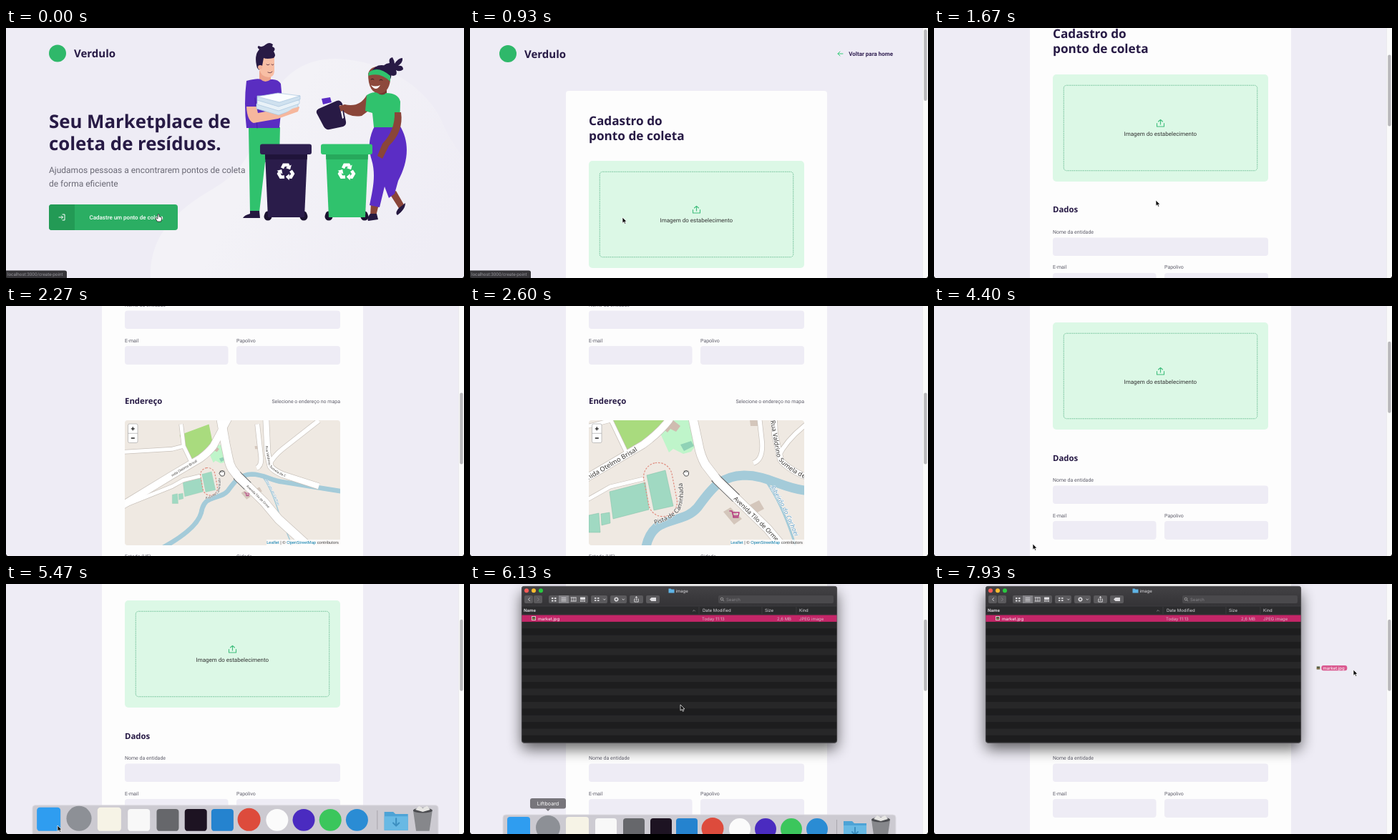
Write an HTML page that moves like this. It is 640x350 px and loops after 8000 ms.

```html
<!DOCTYPE html>
<html lang="pt-BR">
<head>
<meta charset="utf-8">
<title>Ponto de coleta</title>
<style>
html,body{margin:0;width:100%;height:100%;overflow:hidden;background:#eeecf5}
svg{display:block;width:100vw;height:100vh}
text{font-family:Roboto,sans-serif;white-space:pre;text-rendering:geometricPrecision}
.h{font-family:"Noto Sans","Open Sans",sans-serif;font-weight:700;fill:#271a45}
.l{font-size:7px;fill:#5f5e6b}
.in{fill:#eeecf5}
.m text{font-family:"Noto Sans","Open Sans",sans-serif;font-weight:500;fill:#35322f;stroke:#fff;stroke-width:1.2;paint-order:stroke}
.m .road{fill:none;stroke-linejoin:round;vector-effect:non-scaling-stroke}
.w text{font-family:Inter,sans-serif;font-size:6px;fill:#dddce0}
.ln{fill:none;stroke-linecap:round;stroke-linejoin:round}
</style>
</head>
<body>
<svg viewBox="0 0 640 350" xmlns="http://www.w3.org/2000/svg">
<defs>
  <clipPath id="mapClip"><rect x="0" y="0" width="301" height="175" rx="4"/></clipPath>
  <clipPath id="winClip"><rect x="72" y="3" width="441" height="219.5" rx="4"/></clipPath>
  <filter id="shade" x="-20%" y="-20%" width="140%" height="150%"><feGaussianBlur stdDeviation="10"/></filter>
  <linearGradient id="bar" x2="0" y2="1"><stop stop-color="#434245"/><stop offset="1" stop-color="#343336"/></linearGradient>
  <linearGradient id="blob" y1=".2" y2=".6"><stop offset=".4" stop-color="#f3f2f7"/><stop offset="1" stop-color="#efedf5"/></linearGradient>
  <g id="arm"><path d="M-4.600-4.800L-2.500-9H2.500L3.500-7" fill="none" stroke="#fff" stroke-width="4.200"/><path d="M7.200-9.200L-.2-5L5.600-3Z" fill="#fff"/></g>
  <g id="recycle"><g transform="scale(1.080)"><use href="#arm"/><use href="#arm" transform="rotate(120)"/><use href="#arm" transform="rotate(240)"/></g></g>
  <path id="pLeft" d="M-2 81L80 32L110 0"/>
  <path id="pMain" d="M204 108L250 153L300 206"/>
  <path id="pRua" d="M257 0L265 48Q269 62 301 78L350 98"/>
  <path id="pRio" d="M256 92Q277 125 297 178L320 240"/>
  <path id="pPista" d="M92 146Q120 138 128 124Q136 106 128 78"/>
  <path id="pNear" d="M169 5L174 26Q179 42 190 53L224 94L290 160"/>
</defs>

<rect width="640" height="350" fill="#eeecf5"/>

<g id="home">
  <path d="M202 350C200 295 232 258 288 226C350 190 345 150 366 108C386 62 420 43 460 43C530 45 583 82 606 124C616 148 628 168 640 182V350Z" fill="url(#blob)"/>
  <circle cx="72" cy="35.500" r="12" fill="#2fb86a"/>
  <text class="h" x="95" y="41" font-size="15">Verdulo</text>
  <g font-size="25.800"><text class="h" x="60" y="140">Seu Marketplace de</text><text class="h" x="60" y="171">coleta de resíduos.</text></g>
  <g font-size="12" fill="#6a6975"><text x="60" y="203">Ajudamos pessoas a encontrarem pontos de coleta</text><text x="60" y="222">de forma eficiente</text></g>
  <rect x="60" y="247" width="180" height="36" rx="4" fill="#2bae63"/>
  <path d="M64 247H96V283H64Q60 283 60 279V251Q60 247 64 247Z" fill="#239a55"/>
  <path d="M79 261H82V269H79M74 265H79.500M77.500 263L79.500 265L77.500 267" class="ln" stroke="#fff"/>
  <text x="168" y="268" font-size="8" font-weight="500" fill="#fff" text-anchor="middle">Cadastre um ponto de coleta</text>

  <!-- man -->
  <path d="M339 139H383L382 180L362 188L354 258H341Z" fill="#30c26d"/>
  <path d="M341 256H354L355 266H331Q333 262 341 260Z" fill="#251840"/>
  <path d="M354 60H370V76Q362 82 354 75Z" fill="#eda58c"/>
  <path d="M353 40Q363 32 375 40L375 61Q374 69 367 69Q356 68 354 58Z" fill="#f8bea4"/>
  <path d="M351 56Q346 38 354 30Q350 27 353 25Q358 28 363 23Q368 19 373 23L372 26Q378 28 374 33Q378 38 374 42Q364 44 360 42L358 53Q354 50 354 59Z" fill="#281a45"/>
  <circle cx="355" cy="55" r="3" fill="#f3b097"/>
  <path d="M364 51Q366 53 368 51M371 51Q373 53 374 51M366 62Q370 64 372 61" class="ln" stroke="#5c3040" stroke-width=".9"/>
  <path d="M336 74Q352 70 356 72Q362 78 370 72Q380 71 384 78L386 100L382 140H336Q332 105 336 74Z" fill="#5a2dc1"/>
  <path d="M348 98L351 140" class="ln" stroke="#4420a0"/>
  <path d="M336 110H350L352 119L384 113Q398 106 410 111L408 117L380 127L346 133Q337 130 336 110Z" fill="#f6b79d"/>
  <g stroke="#a8c5de" stroke-width=".7"><path d="M350 113L381 122L408 112V106L350 106Z" fill="#d4e5f1"/><path d="M351 107L381 116L410 106V101L351 101Z" fill="#e9f2f8"/><path d="M351 101L381 110L411 100V95L351 95Z" fill="#cfe1ef"/><path d="M351 96L380 91L411 95L382 104Z" fill="#fafdff"/></g>
  <path d="M388 121L400 113L410 110L407 117Z" fill="#f6b79d"/>

  <!-- woman -->
  <path d="M510 245L521 247L517 263H509ZM536 232L545 228L557 249L550 254Z" fill="#8a4539"/>
  <path d="M516 136H550C565 160 562 188 548 214L543 232L535 238L529 222L522 251L508 248C513 225 517 205 511 185C505 165 508 150 516 136Z" fill="#5b2dc5"/>
  <path d="M509 260H518L520 268L506 270Q504 266 509 260ZM549 252L558 245Q558 254 547 262Q543 259 549 252Z" fill="#251840"/>
  <path d="M504 94Q494 112 473 107L468 114Q480 126 497 123L513 111Z" fill="#8a4539"/>
  <path d="M517 82H532V94Q523 98 516 92Z" fill="#74372f"/>
  <path d="M506 64Q509 53 522 54Q537 57 537 73Q535 91 521 92Q506 90 506 64Z" fill="#8d493c"/>
  <path d="M510 62Q517 49 531 53Q542 59 537 72Q530 61 510 62Z" fill="#281a45"/>
  <path d="M527 58Q526 50 536 49Q534 42 540 41Q543 46 543 50Q548 42 554 42Q555 48 548 53Q555 52 555 58Q550 62 545 59Q548 66 541 67Q531 65 527 58Z" fill="#281a45"/>
  <path d="M507 62Q520 52 537 67L537 75Q523 61 506 67Z" fill="#30c26d"/>
  <path d="M510 72Q512 70 514 72M522 73Q524 71 526 73" class="ln" stroke="#351a24" stroke-width="1"/>
  <path d="M510 80Q516 83 523 80Q517 90 510 80Z" fill="#fff"/>
  <path d="M504 94Q514 88 519 91Q526 96 531 91Q548 91 551 103L550 139H514L512 119L502 116Z" fill="#30c26d"/>
  <path d="M543 118H552Q556 145 535 165L526 183L519 179L526 162Q544 143 543 118Z" fill="#8a4539"/>
  <path d="M441 99L453 97L455 104L443 107Z" fill="#5b2dc5"/>
  <path d="M437 113L462 102Q467 100 470 106L475 131Q476 136 471 138L452 142Q447 143 444 138L434 119Q433 115 437 113ZM466 108L470 127L472 126L469 108Z" fill="#281a45" fill-rule="evenodd"/>
  <path d="M465 109L474 107L476 113L468 117Z" fill="#8a4539"/>
  <g id="bins"></g>
</g>

<g id="form">
  <g id="page">
    <circle cx="53" cy="36" r="12" fill="#2fb86a"/>
    <text class="h" x="76" y="41.500" font-size="15">Verdulo</text>
    <path d="M521 36H514M517 33L514 36L517 39" class="ln" stroke="#34cb79"/>
    <text x="591" y="39" font-size="8" font-weight="700" fill="#322153" text-anchor="end">Voltar para home</text>
    <rect x="134" y="88" width="365" height="1068" rx="4" fill="#fdfdfd"/>
    <g font-size="17.200"><text class="h" x="166" y="135.500">Cadastro do</text><text class="h" x="166" y="156.500">ponto de coleta</text></g>
    <rect x="166" y="186" width="301" height="150" rx="5" fill="#dcf8e6"/>
    <rect x="181.250" y="201.250" width="270.500" height="119.500" rx="4" fill="none" stroke="#55b384" stroke-width=".8" stroke-dasharray="1.6 1"/>
    <path d="M311.500 254.500V259H321.500V254.500M316.500 256V249.500M313.500 252L316.500 249.300L319.500 252" class="ln" stroke="#3fbd7c" stroke-width="1.100"/>
    <text x="316.300" y="272" font-size="8" fill="#333" text-anchor="middle">Imagem do estabelecimento</text>
    <g font-size="11.400"><text class="h" x="166" y="379.500">Dados</text><text class="h" x="166" y="545">Endereço</text></g>
    <text class="l" x="166" y="409">Nome da entidade</text>
    <text class="l" x="166" y="458.500">E-mail</text>
    <text class="l" x="322" y="458.500">Papolivo</text>
    <rect class="in" x="166" y="414.500" width="301" height="25.500" rx="4"/>
    <rect class="in" x="166" y="464" width="144.500" height="26" rx="4"/>
    <rect class="in" x="322" y="464" width="145" height="26" rx="4"/>
    <text class="l" x="467" y="543.500" text-anchor="end">Selecione o endereço no mapa</text>
    <g class="m" transform="translate(166 568)" clip-path="url(#mapClip)">
      <rect width="301" height="175" fill="#efe9e2"/>
      <g id="map">
        <path d="M31 0L20 -30L100 -60L112 0L76 36L53 46Z" fill="#a9db7e"/>
        <path d="M98 14L112 -4L146 -2L153 30L143 44L132 47L118 40L112 45Z" fill="#bff5ca"/>
        <path d="M128 34L143 29L147 36L133 43Z" fill="#90d2b6"/>
        <path d="M104 12L109 4L118 0L128 8L122 16L114 12L110 17Z" fill="#cfbcb0"/>
        <path d="M225 0H236V8H226ZM188 128L198 122L214 138L203 146ZM222 120L238 112L245 124L230 132Z" fill="#d4c6bb"/>
        <path d="M-140 330Q60 250 79 182Q84 152 104 145C126 136 140 136 152 122C170 98 182 78 217 77C250 77 268 94 301 98L470 125" fill="none" stroke="#a4cbd9" stroke-width="13"/>
        <path d="M248 86Q272 120 290 180L330 280" fill="none" stroke="#a4cbd9" stroke-width="3"/>
        <g fill="#a0d9c2" stroke="#7fbfa5" stroke-width=".5"><path d="M29 100L79 87L84 125L34 138ZM81 77L107 70L118 120L91 126ZM0 133L14 130L16 157H0ZM17 131L29 129L30 144L18 147Z"/></g>
        <rect x="80" y="59" width="40" height="76" rx="20" transform="rotate(-11 100 97)" fill="none" stroke="#e08d80" stroke-width="1.200" stroke-dasharray="2.500 1.800" vector-effect="non-scaling-stroke"/>
        <g id="roads"></g>
        <g id="farText">
          <text font-size="9.200" dy="3"><textPath href="#pLeft">nida Otelmo Brisal</textPath></text>
          <text font-size="8.400" dy="3"><textPath href="#pMain">Avenida Tilo de Orme</textPath></text>
          <text font-size="8.800" dy="3"><textPath href="#pRua">Rua Valdrino Sumela de C</textPath></text>
          <text font-size="8.800" font-style="italic" dy="3" style="fill:#5f9cc2"><textPath href="#pRio">Ribeirão do Cachoei</textPath></text>
          <text font-size="8.600"><textPath href="#pPista">Pista de Caminhada</textPath></text>
          <path d="M197 127H200L202 134H209L210 129H201M202 134V136H209" class="ln" stroke="#b5397f" stroke-width="1.500"/>
        </g>
      </g>
      <g id="nearText">
        <text font-size="5.600" dy="2"><textPath href="#pNear">Avenida Tilo de Orme</textPath></text>
        <text font-size="5.600" dy="2"><textPath href="#pNear" startOffset="104">Avenida Tilo de Orme</textPath></text>
      </g>
      <g stroke="#aaa" stroke-width=".7"><rect x="4.500" y="5" width="13.500" height="26.500" rx="2" fill="#fff"/><path d="M4.500 18.300H18"/></g>
      <path id="plus" d="M8.800 11.800H13.800M11.300 9.300V14.300" stroke-width="1.300"/>
      <path d="M8.800 25H13.800" stroke="#222" stroke-width="1.300"/>
      <rect x="198" y="167" width="103" height="8" fill="#fff" opacity=".75"/>
      <text x="299" y="173" font-size="5.800" text-anchor="end" style="fill:#444;stroke:none;font-weight:400;font-family:'Liberation Sans',sans-serif"><tspan fill="#0078a8">Leaflet</tspan> | © <tspan fill="#0078a8">OpenStreetMap</tspan> contributors</text>
    </g>
    <text class="l" x="166" y="761">Estado (UF)</text>
    <text class="l" x="322" y="761">Cidade</text>
    <rect class="in" x="166" y="766" width="144.500" height="26" rx="4"/>
    <rect class="in" x="322" y="766" width="145" height="26" rx="4"/>
  </g>
  <path d="M632.500 0H640V350H632.500Z" fill="#fafafa"/><path d="M632.500 0V350" stroke="#e6e5ea" stroke-width=".7"/>
  <rect id="thumb" x="634.200" width="4.400" height="100" rx="2.200" fill="#b9b8bb"/>
</g>

<g id="status">
  <path d="M0 339.500H82Q85 339.500 85 342V350H0Z" fill="#37363a"/>
  <text x="2" y="347" font-size="6.300" fill="#96959b">localhost:3000/create-point</text>
</g>

<g id="win" class="w">
  <rect x="72" y="12" width="441" height="219" rx="6" opacity=".6" filter="url(#shade)"/>
  <g clip-path="url(#winClip)">
    <rect x="72" y="3" width="441" height="220" fill="#1d1d1e"/>
    <g id="rows"></g>
    <rect x="72" y="3" width="441" height="28" fill="url(#bar)"/>
    <rect x="72" y="31" width="441" height="12" fill="#2b2b2d"/>
    <path d="M72 31H513M72 43H513M320 32V42M408 32V42M456 32V42" stroke="#454448" stroke-width=".6"/>
    <circle cx="79" cy="9.300" r="3" fill="#fc5b57"/><circle cx="89" cy="9.300" r="3" fill="#fdbc2f"/><circle cx="99" cy="9.300" r="3" fill="#29c940"/>
    <path d="M277.500 6.500H280.500L281.500 7.500H285.500V12.500H277.500Z" fill="#5fb4e6"/>
    <text x="287.500" y="11.700">image</text>
    <g id="tools" fill="#5b5a5d"></g>
    <g class="ln" stroke="#dcdbde" stroke-width=".9"><path d="M83.500 19.500L81.500 21.500L83.500 23.500M186.500 21L187.800 22.300L189.100 21M213 21L214.300 22.300L215.600 21M230.500 21H229.800V25H235.200V21H234.500M232.500 23V17.500M231 19L232.500 17.500L234 19"/><path d="M94.500 19.500L96.500 21.500L94.500 23.500" stroke="#858488"/><circle cx="204.500" cy="21.500" r="2.200" stroke-width="1.700" stroke-dasharray="1 .7"/><path d="M142 19V24M145 19V24M148 19V24M141 19H148M141 24H148M128 19.300H134M128 21.500H134M128 23.700H134"/></g>
    <path d="M114 19H116.500V21H114ZM118 19H120.500V21H118ZM114 22.500H116.500V24.500H114ZM118 22.500H120.500V24.500H118ZM154 18.500H161V22H154ZM154 23H156V24.500H154ZM156.500 23H158.500V24.500H156.500ZM159 23H161V24.500H159ZM174 19H176.500V20.800H174ZM178 19H180.500V20.800H178ZM174 22.300H176.500V24H174ZM178 22.300H180.500V24H178ZM251 21.500L253.500 19H260V24H253.500Z" fill="#dcdbde"/>
    <circle cx="352" cy="21" r="1.800" fill="none" stroke="#aaa" stroke-width=".8"/><path d="M353.300 22.300L355 24" stroke="#aaa" stroke-width=".8"/>
    <text x="358" y="23.600" style="fill:#858488">Search</text>
    <text x="75" y="39.200" font-weight="700">Name</text><text x="325" y="39.200">Date Modified</text><text x="412" y="39.200">Size</text><text x="460" y="39.200">Kind</text>
    <path d="M311.500 38L313 36.500L314.500 38" class="ln" stroke="#aaa" stroke-width=".7"/>
    <rect x="72" y="43.500" width="441" height="9.400" fill="#c42668"/>
    <use href="#pic" x="86" y="45.200"/>
    <text x="95" y="50.500" style="fill:#fff">market.jpg</text>
    <g style="opacity:.8"><text x="324" y="50.500">Today 11:13</text><text x="449" y="50.500" text-anchor="end">2,6 MB</text><text x="460" y="50.500">JPEG image</text></g>
  </g>
  <rect x="72.300" y="3.300" width="440.400" height="219" rx="4" fill="none" stroke="#626166" stroke-width=".6"/>
</g>

<g id="dock"></g>
<g id="tip" class="w"><rect x="84" y="300" width="50" height="14.500" rx="3" fill="#77757b"/><path d="M105.500 314.500H112.500L109 318Z" fill="#77757b"/><text x="109" y="309.800" text-anchor="middle" style="font-size:7.200px;fill:#fff">Liftboard</text></g>

<g id="ghost" class="w">
  <g id="pic"><rect width="6" height="5.600" fill="#e9e6df"/><rect x=".8" y=".8" width="4.400" height="4" fill="#4c5a44"/><rect x=".8" y="3" width="4.400" height="1" fill="#a9794e"/></g>
  <rect x="7.300" y="-.7" width="36" height="7.200" rx="3" fill="#d8407f" opacity=".85"/><text x="9.500" y="5" style="fill:#fff">market.jpg</text>
</g>

<g id="cursor">
  <path d="M0 0V8.200L2 6.500L3.300 9.300L4.700 8.700L3.500 6H6Z" fill="#111" stroke="#fff" stroke-width=".7"/>
  <path d="M-1-4Q0-5 1-4V-1L4 0Q5 1 4.500 3L3.500 6H-1.500L-4 2Q-4.500 0-2.500 1L-1 2Z" fill="#fff" stroke="#222" stroke-width=".8"/>
  <path d="M-3-1Q-3-4-1.300-3Q0-4.500 1.200-3Q3-3.500 3.500-1.500V1Q3 4 1.500 4H-1.500L-4 .5Q-4-1-3-.5ZM-1.200-1V-2.800M1.200-1V-2.800" fill="#fff" stroke="#222" stroke-width=".8"/>
  <path d="M-1.800-4Q0-4 0-3Q0-4 1.800-4M0-3V3M-1.800 4Q0 4 0 3Q0 4 1.800 4" class="ln" stroke="#333" stroke-width=".9"/>
</g>
<path d="M0 350V347.500L2 350ZM640 350V347.500L638 350Z" fill="#222"/>
</svg>
<script>
const $ = id => document.getElementById(id);
const LOOP = 8000;

const bin = (x, lid, body, dark) => `
  <g transform="translate(${x})"><circle cx="11" cy="261" r="4.500" fill="#1b1230"/><circle cx="61" cy="261" r="4.500" fill="#1b1230"/>
  <circle cx="11" cy="264" r="5.500" fill="#1b1230"/><circle cx="61" cy="264" r="5.500" fill="#1b1230"/>
  <path d="M7 176H66L62 265H11Z" fill="${body}"/><path d="M7 176H66L65.600 184H7.400Z" fill="${dark}"/>
  <rect y="162.500" width="72" height="14.500" rx="3" fill="${lid}"/><use href="#recycle" x="36" y="201.500"/></g>`;
$('bins').innerHTML = bin(355, '#2e2050', '#2a1c4a', '#20143a') + bin(440, '#31c56f', '#30c26d', '#27a85c');

const roads = [
  ['M-300 262L0 79L76 34Q98 18 112 0L160 -90', 10],
  ['M24 -60L31 0L53 46M-200 20L0 8L31 0', 5],
  ['M-200 190L0 110L30 93L76 82', 5],
  ['M130 -90L146 0L153 33Q156 50 163 62L180 84L250 152L290 200L400 300', 12],
  ['M255 -90L260 20L268 55Q275 66 301 78L400 110', 8],
  ['M400 -70L301 8Q276 28 264 52M232 -60L242 30Q244 55 230 60', 6]
];
const stroke = (d, c, w) => `<path class="road" d="${d}" stroke="${c}" stroke-width="${w}"/>`;
$('roads').innerHTML = roads.map(([d, w]) => stroke(d, '#c8c1ba', w + 1.4)).join('') +
  stroke('M176 80L206 109', '#666', 14) +
  roads.map(([d, w]) => stroke(d, '#fff', w)).join('');

$('rows').innerHTML = Array.from({length: 10}, (_, i) =>
  `<rect x="72" y="${52.9 + i * 18.7}" width="441" height="9.350" fill="#272728"/>`).join('');
$('tools').innerHTML = [[76, 12], [89, 12], [110, 55], [169, 23], [196, 23], [223, 19], [246, 19]]
  .map(([x, w]) => `<rect x="${x}" y="16" width="${w}" height="11" rx="2"/>`).join('') +
  '<rect x="124" y="16" width="14" height="11" fill="#848387"/><rect x="347" y="16" width="161" height="11" rx="2" fill="#4a494c"/>';

const icons = [
  [68, 32, '#2f9df0'], [109, 34, '#8d9096', 1], [150, 32, '#f6f3e6'], [190, 30, '#f8f8f8'],
  [229, 30, '#66676b'], [267, 30, '#1d1322'], [303, 30, '#2583cf'], [339, 31, '#dd4b3c', 1],
  [377, 30, '#fbfbfb', 1], [413, 30, '#4a2bc0', 1], [449, 30, '#3bc65c', 1], [485, 30, '#2a8cd4', 1]
];
$('dock').innerHTML = '<rect x="46" y="311" width="549" height="44" rx="4" fill="#cbc9d0" stroke="#dedce2" opacity=".95"/>' +
  icons.map(([x, s, c, round]) => `<rect x="${x - s / 2}" y="${346 - s}" width="${s}" height="${s}" rx="${round ? s / 2 : 4}" fill="${c}"/>`).join('') +
  `<path d="M512.500 318V344" stroke="#a9a7ae"/>
  <path d="M522 320H534L537 323H554V345H522Z" fill="#4da3d6"/><path d="M522 326H554V345H522Z" fill="#68b9e4"/>
  <path d="M538 329V338M534 335L538 339L542 335" class="ln" stroke="#3c8fc0" stroke-width="2"/>
  <path d="M561 318H587L583 346H565Z" fill="#86878b"/><ellipse cx="574" cy="318" rx="13" ry="3.500" fill="#4b4c50"/>
  <path d="M564 317L569 312L574 315L580 312L584 317L574 320Z" fill="#e7e6e4"/>`;

// Value of a keyed track [[time, value...], ...] at t, eased between keys.
function at(track, t, col = 1) {
  if (t <= track[0][0]) return track[0][col];
  for (let i = 1; i < track.length; i++) {
    const a = track[i - 1], b = track[i];
    if (t < b[0]) {
      const u = (t - a[0]) / (b[0] - a[0]);
      return a[col] + (b[col] - a[col]) * u * u * (3 - 2 * u);
    }
  }
  return track[track.length - 1][col];
}

const OPEN = 430;
const scroll = [[1280, 0], [1670, 121], [1800, 200], [2130, 408], [2890, 408], [3120, 317], [3200, 317], [3560, 225], [3930, 176], [4070, 163]];
const zoom = [[2230, -1], [2600, 0], [2850, 1]];
const pos = [
  [0, 213, 265], [930, 213, 265], [1400, 310, 241], [1950, 310, 241], [2270, 302, 234], [2780, 302, 234],
  [3100, 193, 103], [3500, 193, 103], [3930, 185, 190], [4400, 138, 333], [4800, 137, 347], [5250, 72, 338],
  [5600, 72, 338], [5780, 112, 328], [6130, 294, 169], [6530, 165, 82], [7350, 138, 50.5], [7450, 138, 50.5], [7930, 586, 120]
];
const shapes = [[0, 1], [OPEN, 0], [2200, 2], [2870, 0], [3060, 3], [3560, 0]];
const dockY = [[4850, 46], [5130, 0], [5980, 0], [6130, 12], [6380, 46]];
const grow = [[4900, 1], [5250, 1.033], [5850, 1.033], [6100, 1]];
const open = [[5560, .4], [5670, .72], [5800, 1]];
const tip = [[5700, 0], [5760, 1], [6140, 1], [6260, 0]];

const show = (id, on) => $(id).style.display = on ? '' : 'none';
const move = (id, v) => $(id).setAttribute('transform', v);

function draw(t) {
  const s = at(scroll, t), z = 2 ** at(zoom, t), x = at(pos, t), y = at(pos, t, 2);
  show('home', t < OPEN);
  show('form', t >= OPEN);
  show('status', t < 1000);
  move('page', `translate(0 ${-s})`);
  $('thumb').setAttribute('y', 2 + s * .2927);

  move('map', `translate(136 74) scale(${z}) translate(-136 -74)`);
  show('farText', z < 1.9);
  show('nearText', z >= 1.9);
  $('plus').setAttribute('stroke', z >= 1.9 ? '#bbb' : '#222');

  const k = at(open, t), d = at(dockY, t);
  show('win', t >= 5560);
  $('win').style.opacity = Math.min(1, (k - .3) * 2);
  move('win', `translate(292 113) scale(${k}) translate(-292 -113)`);
  show('dock', d < 45);
  const g = at(grow, t);
  move('dock', `translate(320.5 ${350 + d}) scale(${g}) translate(-320.5 -350)`);
  $('tip').style.opacity = at(tip, t);

  show('ghost', t >= 7460);
  move('ghost', `translate(${x - 52} ${y - 5.3})`);
  move('cursor', `translate(${x} ${y})`);
  const kind = shapes.filter(c => c[0] <= t).pop()[1];
  [...$('cursor').children].forEach((c, i) => c.style.display = i === kind ? '' : 'none');
}

const start = performance.now();
function tick() {
  draw((performance.now() - start) % LOOP);
  requestAnimationFrame(tick);
}
tick();
</script>
</body>
</html>
```
